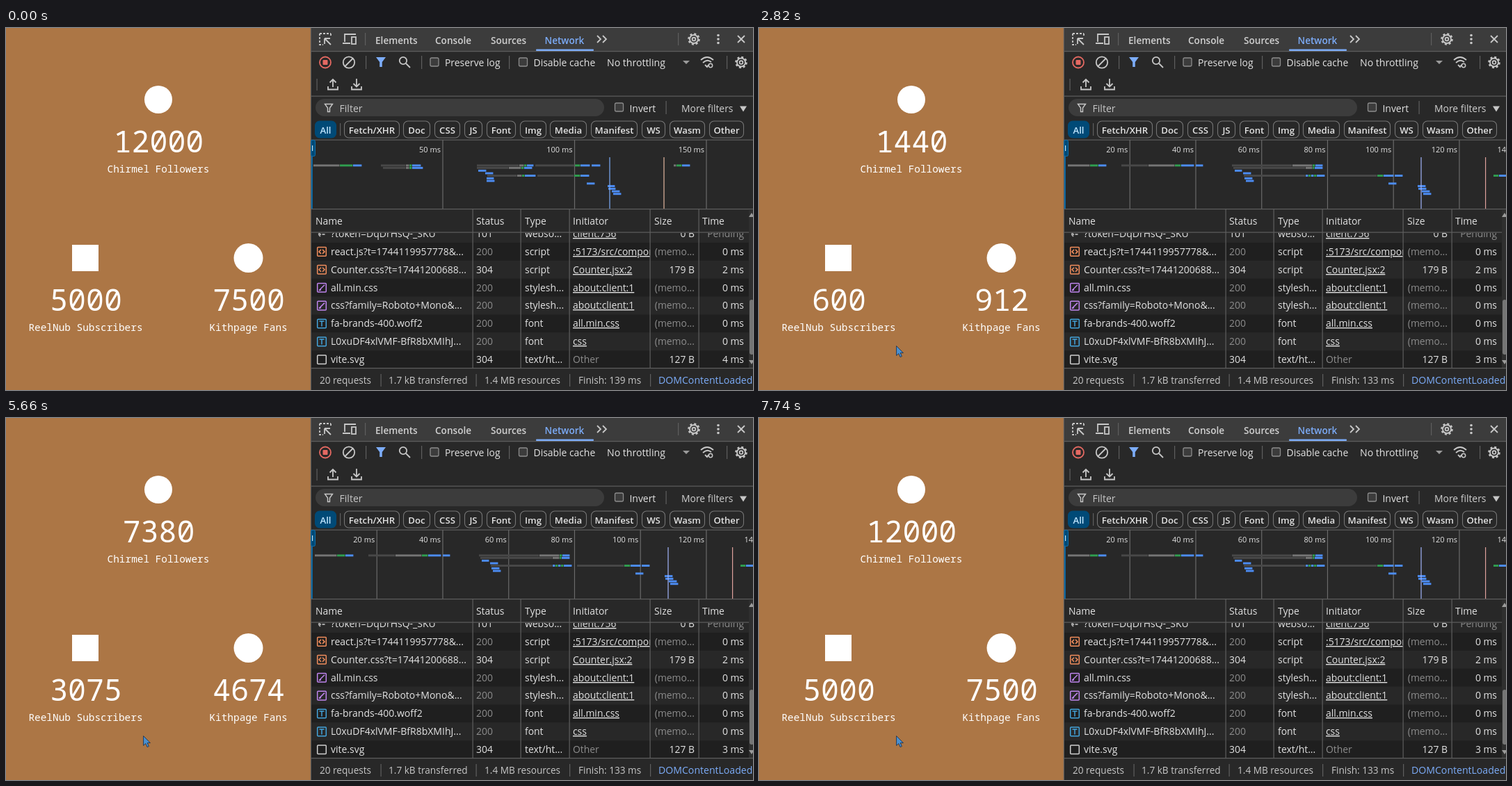
Recreate the animation shown at these times as an HTML page. Size 1074x521 px, loop 8000 ms.

```html
<!DOCTYPE html>
<html lang="en">
<head>
<meta charset="utf-8">
<title>Counters and network panel</title>
<style>
  html, body { margin: 0; width: 100%; height: 100%; overflow: hidden; background: #282828; }
  #stage { display: block; width: 100vw; height: 100vh; }
  text { font-family: "Open Sans", "Noto Sans", sans-serif; white-space: pre; }
  .mono text { font-family: "Noto Sans Mono", "DejaVu Sans Mono", monospace; }
  text.button { font-family: "Liberation Sans", Arial, sans-serif; }
  .icon { fill: none; stroke-width: 1.8; stroke: #c7c7c7; }
</style>
</head>
<body>
<svg id="stage" viewBox="0 0 1074 521" preserveAspectRatio="none"></svg>
<script>
const INK = '#e3e3e3', DIM = '#8c8c8c', RULE = '#5e5e5e', PANEL = '#282828', RAISED = '#3c3c3c',
      BLUE = '#7cacf8', NAVY = '#004a77';

const rect = (x, y, w, h, fill, extra = '') =>
  `<rect x="${x}" y="${y}" width="${w}" height="${h}" fill="${fill}" ${extra}/>`;
const circle = (x, y, r, fill, extra = '') =>
  `<circle cx="${x}" cy="${y}" r="${r}" fill="${fill}" ${extra}/>`;
const text = (x, y, content, fill = INK, size = 13.9, extra = '') =>
  `<text x="${x}" y="${y}" fill="${fill}" font-size="${size}" ${extra}>${content}</text>`;
const path = (d, extra = '') => `<path d="${d}" ${extra}/>`;
const icon = (x, y, body, extra = '') => `<g class="icon" transform="translate(${x} ${y})" ${extra}>${body}</g>`;
const vline = (x, y1, y2, color = RULE) => rect(x, y1, 1.2, y2 - y1, color);
const hline = (y, color = RULE) => rect(439, y, 635, 1.2, color);
const group = (id, body, extra = '') => `<g id="${id}" ${extra}>${body}</g>`;
const clip = (x, y, w, h, body) =>
  `<svg x="${x}" y="${y}" width="${w}" height="${h}" viewBox="${x} ${y} ${w} ${h}" overflow="hidden">${body}</svg>`;
const MIDDLE = 'text-anchor="middle"', END = 'text-anchor="end"', BOLD = 'font-weight="600"';

const counters = [
  { id: 'a', x: 219, y: 179, goal: 12000, label: 'Chirmel Followers' },
  { id: 'b', x: 114.5, y: 407, goal: 5000, label: 'ReelNub Subscribers' },
  { id: 'c', x: 348.6, y: 407, goal: 7500, label: 'Kithpage Fans' },
];

function page() {
  return rect(0, 0, 438, 521, '#ac7645') + vline(437.8, 0, 521) +
    circle(219, 103, 20, '#fff') + rect(95, 312, 38, 38, '#fff') + circle(348.5, 331, 21, '#fff') +
    counters.map(c =>
      text(c.x + .5, c.y, c.goal, '#fff', 43.2, `id="${c.id}" ${MIDDLE}`) +
      text(c.x, c.y + 29, c.label, '#fff', 14.4, MIDDLE)).join('');
}

const gear = (x, y) => icon(x, y,
  '<circle r="6"/><circle r="7.6" stroke-dasharray="2.98 2.99" stroke-width="2.4"/><circle r="2.4"/>');
const checkbox = (x, y) => rect(x - 6, y - 6, 12, 12, RAISED, `rx="2" stroke="${DIM}" stroke-width="1.3"`);
const caret = (x, y, height, color) =>
  path(`M${x - 5} ${y - height / 2}h10l-5 ${height}z`, `fill="${color}"`);

function toolbar() {
  const tabs = [[531, 'Elements'], [617, 'Console'], [697, 'Sources'], [774.5, 'Network']];
  const filters = [['All', 444, 475], ['Fetch/XHR', 486, 566], ['Doc', 571, 610], ['CSS', 616, 653],
    ['JS', 659, 685], ['Font', 691, 733], ['Img', 739, 777], ['Media', 782, 835],
    ['Manifest', 841, 908], ['WS', 914, 948], ['Wasm', 954, 1005], ['Other', 1011, 1061]];
  return rect(439, 0, 635, 33, RAISED) + hline(33) +
    icon(459, 16, path('M-8-8H8M-8-8V8H-3', 'stroke-dasharray="3 2"') + path('M8-8V-3', 'stroke-dasharray="3 2"') +
      path('M-1-1H7M-1-1V7M-1-1L8 8')) +
    icon(494, 16, path('M-7 4V-7H9M-10 6H1') + '<rect x="3" y="-3" width="6" height="10"/>') +
    vline(516, 7, 25) +
    tabs.map(([x, name]) => text(x, 23, name, name === 'Network' ? BLUE : '#d0d0d0', 13.6, BOLD)).join('') +
    rect(762, 30.5, 83, 2.5, BLUE, 'rx="1"') +
    icon(857, 16, path('M-7-5l5 5-5 5M1-5l5 5-5 5')) +
    vline(966, 7, 25) + gear(989, 16) +
    [-5.5, 0, 5.5].map(d => circle(1024, 16 + d, 1.8, '#c7c7c7')).join('') +
    icon(1057, 16, path('M-5-5L5 5M5-5L-5 5')) +

    circle(459, 49.5, 8, 'none', 'stroke="#e46962" stroke-width="1.8"') + rect(455.5, 46, 7, 7, '#e46962', 'rx="1"') +
    icon(493, 49.5, '<circle r="8.2"/><path d="M-6 6L6-6"/>') + vline(517, 40, 59) +
    path('M532 42h14l-5.2 7v7h-3.6v-7z', `fill="${BLUE}"`) +
    icon(572, 48, '<circle cx="-1" cy="-1" r="5.2"/><path d="M3 3l6 6"/>') + vline(597, 40, 59) +
    checkbox(616, 49) + text(631, 55, 'Preserve log') + vline(723, 40, 59) +
    checkbox(743.5, 49) + text(758.5, 55, 'Disable cache') +
    text(864, 55, 'No throttling', INK, 14.1) + caret(978, 49.5, 5, '#9a9a9a') +
    icon(1008, 49, path('M-9-3Q0-11 9-3M-6 1Q0-5 6 0M-3 4L0 7L2 4') +
      '<circle cx="5" cy="5" r="2.7" stroke-width="1.5"/>') +
    vline(1036, 40, 59) + gear(1057, 49.5) +

    vline(446.5, 73, 90) +
    icon(470, 81, path('M-7 3v4.5H7V3M0 4V-6M-4.5-2.5L0-7l4.5 4.5')) +
    icon(504, 81, path('M-7 3v4.5H7V3M0-8V3M-4.5-1L0 3.5l4.5-4.5')) + hline(97.5) +

    rect(445, 102, 415, 25, RAISED, 'rx="12.5"') +
    icon(464, 115, path('M-5.5-5.5h11l-4 5.5v5.5h-3V0z', 'stroke-width="1.4"')) +
    text(479.5, 120.5, 'Filter', '#c7c7c7', 14.1) +
    checkbox(881.5, 114) + text(896.5, 120.5, 'Invert') + vline(948.5, 105, 124) +
    text(971, 120.5, 'More filters', '#d0d0d0') + caret(1060, 116.5, 8, '#c7c7c7') +
    filters.map(([name, left, right], i) =>
      rect(left + .5, 134, right - left - 1, 24, i ? 'none' : NAVY,
        `rx="6.5" stroke="${i ? '#757575' : NAVY}" stroke-width="1.1"`) +
      text((left + right) / 2, 151.5, name, i ? INK : '#c2e7ff', 13.2, `${MIDDLE} ${BOLD}`)).join('') +
    vline(480, 137, 155) + hline(160.5) + hline(260);
}

// Bars: y, start x, then lettered run lengths (d queued, k waiting, g server, b download, s gap).
const barColors = { d: '#484848', k: '#757575', g: '#2f9e4f', b: '#4c8df6' };
function bars(rows) {
  return rows.map(([y, x, runs]) => runs.split(' ').map(run => {
    const width = +run.slice(1), color = barColors[run[0]];
    const body = color ? rect(x, y - 1.1, width - .6, 2.9, color) : '';
    x += width;
    return body;
  }).join('')).join('');
}

const oldBars = [
  [197.5, 442, 'k38 g19 b13'], [197.5, 539, 'd36 k5 g4 b13'], [201, 542, 'd33 k5 g4 b16'],
  [197.5, 677, 'd61 k7 g4 b10 s2 d57 g8 b14 s2 b13'], [201, 677, 'd46 k18 g4 b12'],
  [205, 679, 'b12'], [208.7, 689, 'b12'], [212.2, 692, 'd43 k7 g4 b16 s2 d53 g9 b13'],
  [216, 691, 'b11'], [219.7, 691, 'b12'], [223.5, 835, 'b12'],
  [227.2, 865, 'b11'], [231, 866, 'b11'], [234.7, 871, 'b12'], [238.4, 873, 'b12'],
  [197.5, 960, 'k4 g8 b12'],
];
const newBars = [
  [197.5, 444, 'k32 g12 b12'], [197.5, 521, 'd39 k38 g9 b19 s2 b11'],
  [197.5, 680, 'd87 k29 g4 b11'], [201, 682, 'd104 k10 g3 b12'],
  [205, 684, 'b11'], [208.7, 696, 'b12'], [212.2, 697, 'd89 b4 g4 b4 g4 b12 s7 d68 g9 b15 s1 b12'],
  [216, 698, 'b12'], [219.7, 700, 'b12'], [223.5, 905, 'b12'],
  [227.2, 947, 'b12'], [231, 948, 'b12'], [234.7, 953, 'b12'], [238.4, 955, 'b12'],
  [212.2, 1056, 'g8 b12'],
];

function ruler(step, perMs) {
  let out = '';
  for (let ms = step; ms <= 150; ms += step) {
    const x = 438.5 + ms * perMs;
    out += vline(x - .6, 161, 260, '#6a6a6a') + text(x - 3, 179, `${ms} ms`, INK, 11, END);
  }
  return out;
}
const handle = rect(439, 161, 1.8, 99, '#0b6fae') +
  rect(438.5, 161.5, 6, 23, NAVY, 'rx="2" stroke="#0b6fae"') + vline(440, 169, 177, '#c2e7ff');

const fileIcons = {
  script: ['#f08d5c', 'M-1-3l-3 3 3 3M1-3l3 3-3 3'],
  sheet: ['#bf85ee', 'M-4 4L4-4M-4 4l3-1'],
  font: ['#43a4dc', 'M-3.5-3.5h7M0-3.5v7.5'],
  page: ['#d0d0d0', ''],
};
function fileIcon(kind, y) {
  if (kind === 'socket') return icon(454, y + 1, path('M-5 0H6M-2-3l-3 3 3 3', 'stroke-dasharray="4 1.5"'), 'opacity=".8"');
  const [color, mark] = fileIcons[kind];
  return `<g transform="translate(454 ${y})" fill="none" stroke="${color}" stroke-width="1.5">` +
    '<rect x="-6.3" y="-6.3" width="12.6" height="12.6" rx="1"/>' + path(mark) + '</g>';
}

const requests = [
  ['socket', '?token=DqDrHsQ-_SKU', '101', 'webso...', 'client:756', '0 B', 'Pending'],
  ['script', 'react.js?t=1744119957778&amp;...', '200', 'script', ':5173/src/components', '(memo...', '0 ms'],
  ['script', 'Counter.css?t=17441200688...', '304', 'script', 'Counter.jsx:2', '179 B', '2 ms'],
  ['sheet', 'all.min.css', '200', 'stylesh...', 'about:client:1', '(memo...', '0 ms'],
  ['sheet', 'css?family=Roboto+Mono&amp;...', '200', 'stylesh...', 'about:client:1', '(memo...', '0 ms'],
  ['font', 'fa-brands-400.woff2', '200', 'font', 'all.min.css', '(memo...', '0 ms'],
  ['font', 'L0xuDF4xlVMF-BfR8bXMIhJ...', '200', 'font', 'css', '(memo...', '0 ms'],
  ['page', 'vite.svg', '304', 'text/ht...', 'Other', '127 B', ''],
];

function table() {
  const heads = [[445, 'Name'], [676, 'Status'], [746, 'Type'], [815, 'Initiator'], [932, 'Size'], [1001, 'Time']];
  const rows = requests.map(([kind, name, status, type, from, size, time], i) => {
    const mid = 296 + 25.9 * i, y = Math.round(mid + 4.8);
    const muted = value => /^(200|\(memo|Pending|Other)/.test(value) ? DIM : INK;
    return rect(439, mid - 13, 629, 26, i % 2 ? '#1f1f1f' : PANEL) + fileIcon(kind, mid) +
      text(467, y, name, INK, 14) + text(676, y, status, muted(status)) + text(746, y, type) +
      clip(811, mid - 13, 115, 26, text(815, y, from, muted(from), 13.9, from === 'Other' ? '' : 'text-decoration="underline"')) +
      text(990, y, size, muted(size), 13.9, END) +
      text(1061, y, time, muted(time), 13.9, END + (time ? '' : ' id="lastTime"'));
  }).join('');
  const footer = [[451, '20 requests'], [550, '1.7 kB transferred'], [688, '1.4 MB resources'], [823, '']];
  return clip(439, 295, 635, 194, rows) +
    heads.map(([x, name]) => text(x, 283, name)).join('') + hline(293.5) +
    [671, 740, 810, 926, 996].map(x => vline(x - .5, 261, 489)).join('') +
    rect(1068, 261, 6, 228, '#2f2f2f') + rect(1069, 391, 6, 79, '#757575', 'rx="3"') +
    path('M1068 272l4-6 4 6zM1068 478l4 6 4-6z', 'fill="#9a9a9a"') + hline(489) +
    footer.map(([x, label]) => text(x, 512, label, '#c7c7c7', 13.6, label ? '' : 'id="finish"')).join('') +
    [538.5, 675.5, 810, 926].map(x => vline(x, 498, 516)).join('') +
    text(938, 512, 'DOMContentLoaded', BLUE, 14.1);
}

function message() {
  const lines = ['Perform a request or reload the page by using',
    'the "Reload page" button or by hitting Ctrl +',
    'R. <tspan fill="#a8c7fa" text-decoration="underline">Learn more</tspan>'];
  return text(759.5, 342.5, 'Currently recording network activity', INK, 16, `${MIDDLE} ${BOLD}`) +
    lines.map((line, i) => text(759.5, 369.5 + 20 * i, line, '#d0d0d0', 14, MIDDLE)).join('') +
    rect(703, 430, 114, 29.5, NAVY, 'rx="14.75"') +
    text(759.5, 449.5, 'Reload page', '#c2e7ff', 15, `class="button" ${MIDDLE}`);
}

const stage = document.getElementById('stage');
stage.innerHTML = rect(0, 0, 1074, 521, PANEL) + group('page', page(), 'class="mono"') + toolbar() +
  group('oldRuler', ruler(50, 3.79)) + group('newRuler', ruler(20, 4.737)) + handle +
  group('oldBars', bars(oldBars) + vline(867.4, 186, 260, BLUE) + vline(945.4, 186, 260, '#e3b7a0')) +
  group('newBars', bars(newBars) + vline(951.4, 186, 260, '#a3b5fa') + vline(1044, 186, 260, '#dfa29c')) +
  group('table', table()) + group('message', message()) +
  group('pointer', circle(0, 0, 12, '#ff0', 'id="click" fill-opacity=".47"') +
    path('M.6 .6V14.4L3.8 11.5L6 16.6L8.4 15.5L6.2 10.6H10.4Z', 'fill="#4a90d0" stroke="#1f3350" stroke-width=".9"'));

const el = id => document.getElementById(id);
const show = (id, on) => { el(id).style.display = on ? '' : 'none'; };

// Screen refreshes and counter steps: time, refresh number, counter steps.
const pace = [[2000, 0, -6], [2820, 12, 24], [3640, 24, 54], [4830, 41, 95], [6510, 65, 156], [7740, 83, 201]];
function progress(time) {
  if (time < 2000) return { refresh: -1, steps: 200 };
  const i = pace.findLastIndex(([from]) => time >= from);
  if (i === pace.length - 1) return { refresh: 83, steps: 200 };
  const [t0, r0, s0] = pace[i], [t1, r1, s1] = pace[i + 1];
  const refresh = r0 + Math.floor((time - t0) / (t1 - t0) * (r1 - r0) + 1e-6);
  const steps = Math.round(s0 + (s1 - s0) * (refresh - r0) / (r1 - r0));
  return { refresh, steps: refresh < 2 ? 200 : Math.min(200, Math.max(0, steps)) };
}

function draw(time) {
  const { refresh, steps } = progress(time);
  const before = refresh < 0, after = refresh >= 2;
  counters.forEach(c => { el(c.id).textContent = Math.min(c.goal, steps * Math.ceil(c.goal / 200)); });
  show('oldRuler', !after);
  show('newRuler', after);
  show('oldBars', before);
  show('newBars', after);
  show('table', before || after);
  show('message', !before && !after);
  el('finish').textContent = `Finish: ${before ? 139 : 133} ms`;
  el('lastTime').textContent = before ? '4 ms' : '3 ms';

  const u = Math.min(6, Math.max(0, Math.floor((time - 130) / 70))) / 6;
  const e = 1 - (1 - u) ** 2;
  show('pointer', time >= 130);
  show('click', time >= 820 && time < 880);
  el('pointer').setAttribute('transform', `translate(${1054 - 857 * e} ${503 - 222.7 * e + 176.7 * e * e})`);
}

const start = performance.now();
function tick() {
  draw((performance.now() - start) % 8000);
  requestAnimationFrame(tick);
}
tick();
</script>
</body>
</html>
```
